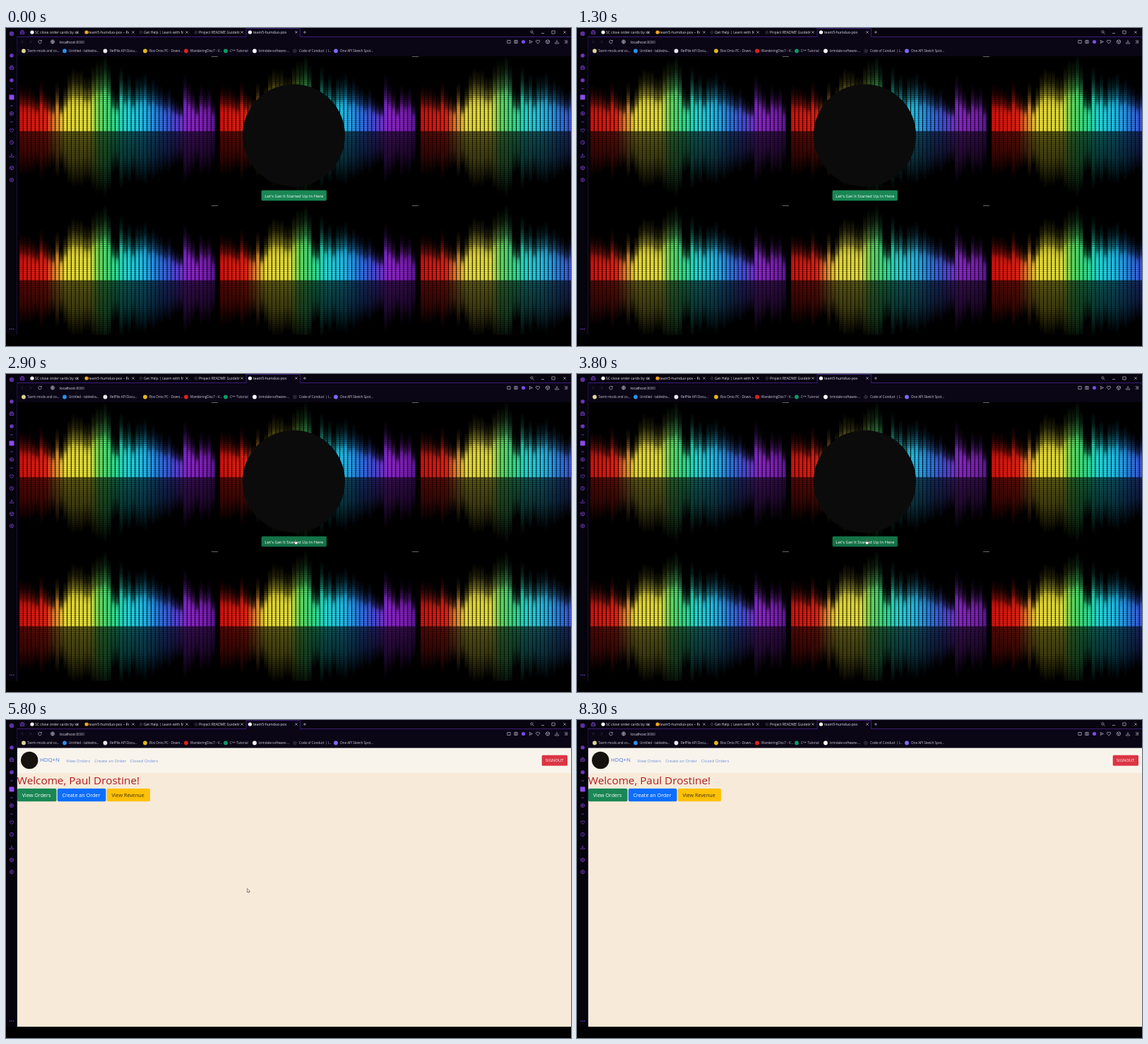
An HTML page for the animation above (9.4 s loop, 800 by 450 pixels).

```html
<!DOCTYPE html>
<html lang="en">
<head>
<meta charset="utf-8">
<title>Order desk</title>
<style>
html, body { margin: 0; width: 100%; height: 100%; overflow: hidden; background: #000; }
svg { display: block; width: 100vw; height: 100vh; }
text { font-family: "Open Sans", "Noto Sans", sans-serif; white-space: pre; }
.icon { fill: none; stroke: #7a3fd0; stroke-width: .8; }
.pale { fill: none; stroke: #b9b3c6; stroke-width: .7; }
</style>
</head>
<body>
<svg id="stage" viewBox="0 0 800 450">
  <defs>
    <linearGradient id="hues" gradientUnits="userSpaceOnUse" x1="0" x2="284" y1="0" y2="0">
      <stop offset=".02" stop-color="#e0140e"/>
      <stop offset=".14" stop-color="#f02212"/>
      <stop offset=".19" stop-color="#f09030"/>
      <stop offset=".24" stop-color="#fbe936"/>
      <stop offset=".36" stop-color="#f2ee3c"/>
      <stop offset=".41" stop-color="#6cea60"/>
      <stop offset=".48" stop-color="#30ec92"/>
      <stop offset=".54" stop-color="#24e6e0"/>
      <stop offset=".63" stop-color="#22c6fa"/>
      <stop offset=".71" stop-color="#2c7cf0"/>
      <stop offset=".78" stop-color="#4c4ce6"/>
      <stop offset=".85" stop-color="#9428d8"/>
      <stop offset=".94" stop-color="#8420be"/>
      <stop offset="1" stop-color="#541290"/>
    </linearGradient>
    <linearGradient id="rise" x1="0" x2="0" y1="0" y2="1">
      <stop offset="0" stop-color="#fff" stop-opacity="0"/>
      <stop offset=".2" stop-color="#fff" stop-opacity=".15"/>
      <stop offset=".4" stop-color="#fff" stop-opacity=".5"/>
      <stop offset=".5" stop-color="#fff" stop-opacity=".86"/>
      <stop offset=".62" stop-color="#fff"/>
    </linearGradient>
    <linearGradient id="sink" x1="0" x2="0" y1="0" y2="1">
      <stop offset="0" stop-color="#fff" stop-opacity=".38"/>
      <stop offset=".5" stop-color="#fff" stop-opacity=".27"/>
      <stop offset="1" stop-color="#fff" stop-opacity="0"/>
    </linearGradient>
    <pattern id="slots" width="8" height="2.9" patternUnits="userSpaceOnUse">
      <rect width="8" height=".9" opacity=".35"/>
    </pattern>
    <mask id="bars" maskUnits="userSpaceOnUse" x="0" y="0" width="284" height="211"></mask>
    <clipPath id="pageClip"><rect x="16" y="39.5" width="784" height="394.5"/></clipPath>
    <g id="tile">
      <rect width="284" height="211" fill="url(#hues)" mask="url(#bars)"/>
      <rect width="284" height="211" fill="url(#slots)"/>
      <rect x="275" y="0" width="9" height="1" fill="#666"/>
    </g>
  </defs>
  <rect width="800" height="450"/>
  <g id="chrome"></g>
  <g clip-path="url(#pageClip)">
    <g id="hero"></g>
    <g id="home"></g>
  </g>
  <g id="cursor">
    <path id="arrow" d="M0 0V5.4L1.3 4.2L2.2 6L3.1 5.6L2.3 3.9H4Z" fill="#fff" stroke="#222" stroke-width=".5"/>
    <path id="hand" d="M-.6 0Q0-.7 .6 0V2.3L2.7 2.8Q3.2 3 3 4.1L2.4 6H-.7L-2.2 3.6Q-2-.1-.6 3.2Z" fill="#fff" stroke="#222" stroke-width=".5"/>
  </g>
</svg>
<script>
const $ = id => document.getElementById(id);
const LOOP = 9400, STEP = 100, LOGIN = 5800;

const rect = (x, y, w, h, fill, r = 0) =>
  `<rect x="${x}" y="${y}" width="${w}" height="${h}" rx="${r}" fill="${fill}"/>`;
const disc = (x, y, r, fill) => `<circle cx="${x}" cy="${y}" r="${r}" fill="${fill}"/>`;
const text = (x, y, size, fill, str) =>
  `<text x="${x}" y="${y}" font-size="${size}" fill="${fill}">${str}</text>`;
const icon = (x, y, d, cls = 'icon') => `<path class="${cls}" transform="translate(${x} ${y})" d="${d}"/>`;

const shape = {
  ring: 'M-2.6 0A2.6 2.6 0 1 1 2.6 0A2.6 2.6 0 1 1-2.6 0',
  dot: 'M-.9 0A.9 .9 0 1 1 .9 0A.9 .9 0 1 1-.9 0',
  cross: 'M-1.7-1.7L1.7 1.7M1.7-1.7L-1.7 1.7',
  plus: 'M-2 0H2M0-2V2',
  heart: 'M0 2.6L-2.6-.2Q-3-2.4-1.2-2.3Q-.2-2.2 0-1.2Q.2-2.2 1.2-2.3Q3-2.4 2.6-.2Z',
  clock: 'M0-1.5V.2L1.2 .8',
  load: 'M0-2.6V1M-1.4-.4L0 1L1.4-.4M-2.6 1V2.5H2.6V1',
  cube: 'M0-2.8L2.5-1.4V1.4L0 2.8L-2.5 1.4V-1.4ZM-2.5-1.4L0 0L2.5-1.4M0 0V2.8',
  box: 'M-2.2-2H2.2V2H-2.2Z',
  bag: 'M-2.7-1H2.7V2.5H-2.7ZM-1.3-1V-2.5H1.3V-1M-2.7 .7H2.7',
  play: 'M-.8-1.2L1.3 0L-.8 1.2Z',
  send: 'M-2-2L2.4 0L-2 2L-1 0Z',
  back: 'M1-2L-1 0L1 2',
  next: 'M-1-2L1 0L-1 2',
  lines: 'M-2.3-1.6H2.3M-1 0H2.3M-2.3 1.6H2.3',
  dash: 'M-2 0H2',
  reload: 'M2 -1.2A2.3 2.3 0 1 0 2.3 .6M2.3-2.5V-.9H.7',
  search: 'M-2.2-.6A1.6 1.6 0 1 1 1-.6A1.6 1.6 0 1 1-2.2-.6M.5 .6L2.3 2.4',
  globe: 'M-2.4 0H2.4M0-2.5Q-2 0 0 2.5Q2 0 0-2.5'
};

// Bars glow upward from the base line and fade downward as a reflection.
function drawBars() {
  const tops = [32, 30, 30, 26, 22, 36, 26, 22, 18, 34, 18, 30, 42, 48, 46, 46, 40,
    40, 50, 56, 56, 62, 52, 28, 24, 50, 36, 42, 30, 40, 40, 44, 34, 38, 32, 30, 24,
    28, 20, 16, 14, 42, 34, 26, 16, 32, 26, 30, 16];
  const base = 106;
  $('bars').innerHTML = tops.map((top, i) => {
    const x = 3.2 + i * 5.66, up = top * 1.4 + 22, down = top + 32;
    return rect(x, base - up, 4.7, up, 'url(#rise)') + rect(x, base, 4.9, down, 'url(#sink)');
  }).join('');
}

function drawChrome() {
  const tabs = [
    [37, 41, 62, 101, '#fff', 'SC close order cards by su'],
    [114, 117, 57, 180, '#f6a623', 'team5-humduo-pos – Realti'],
    [191, 195, 56, 256, '#25212c', 'Get Help | Learn with Mr. K'],
    [269, 273, 58, 334, '#25212c', 'Project README Guideline'],
    [345.5, 350, 55, 411, '#fff', 'team5-humduo-pos']
  ];
  const marks = [
    [25, 30, '#e0d49a', 'Tavrin mods and co...'],
    [83, 89, '#2f8fe8', 'Untitled - tabledra...'],
    [140.5, 147, '#e8e8ec', 'RefPile API Docu...'],
    [197, 203, '#e3b71c', 'Box Onto PC - Down...'],
    [255, 261, '#e02020', 'WanderingDisc7 - V...'],
    [311, 317, '#0c9a68', 'C++ Tutorial'],
    [352, 358, '#fff', 'brindale-software-...'],
    [409, 415, '#28242e', 'Code of Conduct | I...'],
    [467, 473, '#7a6cf0', 'One API Sketch Spot...']
  ];
  const side = [[56, 'bag'], [86, 'dash'], [110, 'dash'], [121, 'ring'], [121, 'play'],
    [133, 'dash'], [145, 'heart'], [162, 'ring'], [162, 'clock'], [180, 'load'],
    [198, 'cube'], [215, 'ring'], [215, 'dot']];
  const tools = [[712, 'box'], [722, 'box'], [722, 'dot'], [743, 'send'], [753, 'heart'],
    [767, 'cube'], [780, 'load'], [793, 'lines']];

  let s = rect(0, 0, 800, 40, '#07040f') + rect(16, 13, 784, 26.5, '#0a0616') +
    rect(0, 0, 15, 434, '#05030b') + rect(15, 12, .8, 422, '#25134a') +
    rect(340, 0, 76, 13, '#0a0616') +
    '<path d="M15.5 12.5H340V.5H416.5V12.5H800" fill="none" stroke="#4a2490" stroke-width=".8"/>';

  tabs.forEach(([ix, x, w, cx, color, str], i) => {
    s += `<clipPath id="tab${i}"><rect x="${x}" width="${w}" height="13"/></clipPath>` +
      disc(ix, 6, 2.6, color) + `<g clip-path="url(#tab${i})">${text(x, 7.9, 5.1, '#e4e0ea', str)}</g>` +
      icon(cx, 6, shape.cross, 'pale');
  });
  marks.forEach(([ix, x, color, str]) => {
    s += disc(ix, 32.5, 2.9, color) + text(x, 34.2, 4.6, '#d4cfdd', str);
  });
  side.forEach(([y, name]) => { s += icon(8, y, shape[name]); });
  tools.forEach(([x, name]) => { s += icon(x, 19.5, shape[name], 'pale'); });

  s += disc(8, 8, 3.3, '#5c2fa0') + disc(8, 39, 2.8, '#6d35bd') + disc(8, 74, 2.8, '#6d35bd') +
    rect(4.5, 94.5, 7, 7, '#8a4be8', 1) + disc(732.5, 19.5, 2.6, '#7c48ee');
  for (const x of [5.6, 8, 10.4]) s += disc(x, 426, .7, '#8a4be8');
  s += icon(23, 6, shape.bag) + icon(423, 6, shape.plus, 'pale') +
    icon(745, 6, shape.search, 'pale') + icon(760, 7.5, shape.dash, 'pale') +
    icon(775, 6, shape.box, 'pale') + icon(791, 6, shape.cross, 'pale') +
    `<g opacity=".35">${icon(23, 19.5, shape.back, 'pale')}${icon(35, 19.5, shape.next, 'pale')}</g>` +
    icon(48, 19.5, shape.reload, 'pale') + icon(66, 19.5, shape.ring, 'pale') + icon(66, 19.5, shape.globe, 'pale') +
    text(76, 21.5, 5.2, '#f0edf5', 'localhost<tspan fill="#b9b3c6">:8080</tspan>');
  $('chrome').innerHTML = s;
}

function drawHero() {
  let s = '';
  for (const y of [40, 251])
    for (const x of [16, 300, 584]) s += `<use href="#tile" x="${x}" y="${y}"/>`;
  s += disc(407.5, 152, 72.5, '#0b0b0c') +
    '<rect id="start" x="362" y="230" width="91.7" height="14" rx="1.4" stroke-width=".8"/>' +
    text(366.3, 239.5, 6, '#fff', "Let's Get It Started Up In Here");
  $('hero').innerHTML = s;
}

function drawHome() {
  $('home').innerHTML = rect(16, 39.5, 784, 395, '#f8ead8') + rect(16, 39.5, 784, 35.5, '#f8f4ec') +
    disc(33.2, 57, 12.2, '#14110e') + text(48, 59.3, 7.8, '#4a76dc', 'HDQ+N') +
    text(85.3, 59.7, 6, '#6f90dc', 'View Orders') +
    text(125.2, 59.7, 6, '#6f90dc', 'Create an Order') +
    text(175.5, 59.7, 6, '#6f90dc', 'Closed Orders') +
    rect(758.7, 49.7, 36.3, 15, '#dc3545', 1.5) + text(763.8, 59.4, 5.9, '#fff', 'SIGNOUT') +
    text(15.8, 90.8, 15.3, '#b01c22', 'Welcome, Paul Drostine!') +
    rect(16, 97, 55.5, 18.3, '#198754', 2) + text(22.8, 109, 7.2, '#fff', 'View Orders') +
    rect(72.8, 97, 68.7, 18.3, '#0d6efd', 2) + text(79.5, 109, 7.2, '#fff', 'Create an Order') +
    rect(142.8, 97, 61.2, 18.3, '#ffc107', 2) + text(149.5, 109, 7.2, '#3a2f10', 'View Revenue');
}

// Pointer track: [ms, x, y]
const track = [[2100, 476, 330], [2800, 410, 235], [4100, 410, 235], [4500, 398.5, 256.5],
  [5200, 341.5, 238.5], [5800, 341.5, 238.5], [6700, 362, 290], [7700, 456, 380], [8300, 500, 440]];

function pointerAt(t) {
  const i = track.findIndex(p => p[0] > t);
  if (i < 1) return null;
  const [a, b] = [track[i - 1], track[i]];
  const u = (t - a[0]) / (b[0] - a[0]), k = u * u * (3 - 2 * u);
  return [a[1] + (b[1] - a[1]) * k, a[2] + (b[2] - a[2]) * k];
}

const show = (id, on) => $(id).setAttribute('display', on ? 'inline' : 'none');

function render(ms) {
  const t = Math.floor(ms % LOOP / STEP) * STEP;
  const loggedIn = t >= LOGIN;
  show('hero', !loggedIn);
  show('home', loggedIn);

  const p = pointerAt(t);
  const over = !!p && !loggedIn && p[0] > 362 && p[0] < 454 && p[1] > 230 && p[1] < 244;
  const focused = t >= 4100;
  $('start').setAttribute('fill', over || focused ? '#157347' : '#198754');
  $('start').setAttribute('stroke', focused ? '#2f9468' : over ? '#146c43' : '#198754');

  show('cursor', p);
  show('hand', over);
  show('arrow', !over);
  if (p) $('cursor').setAttribute('transform', `translate(${p[0]} ${p[1]})`);
}

drawBars();
drawChrome();
drawHero();
drawHome();
const begin = performance.now();
(function tick() {
  render(performance.now() - begin);
  requestAnimationFrame(tick);
})();
</script>
</body>
</html>
```
